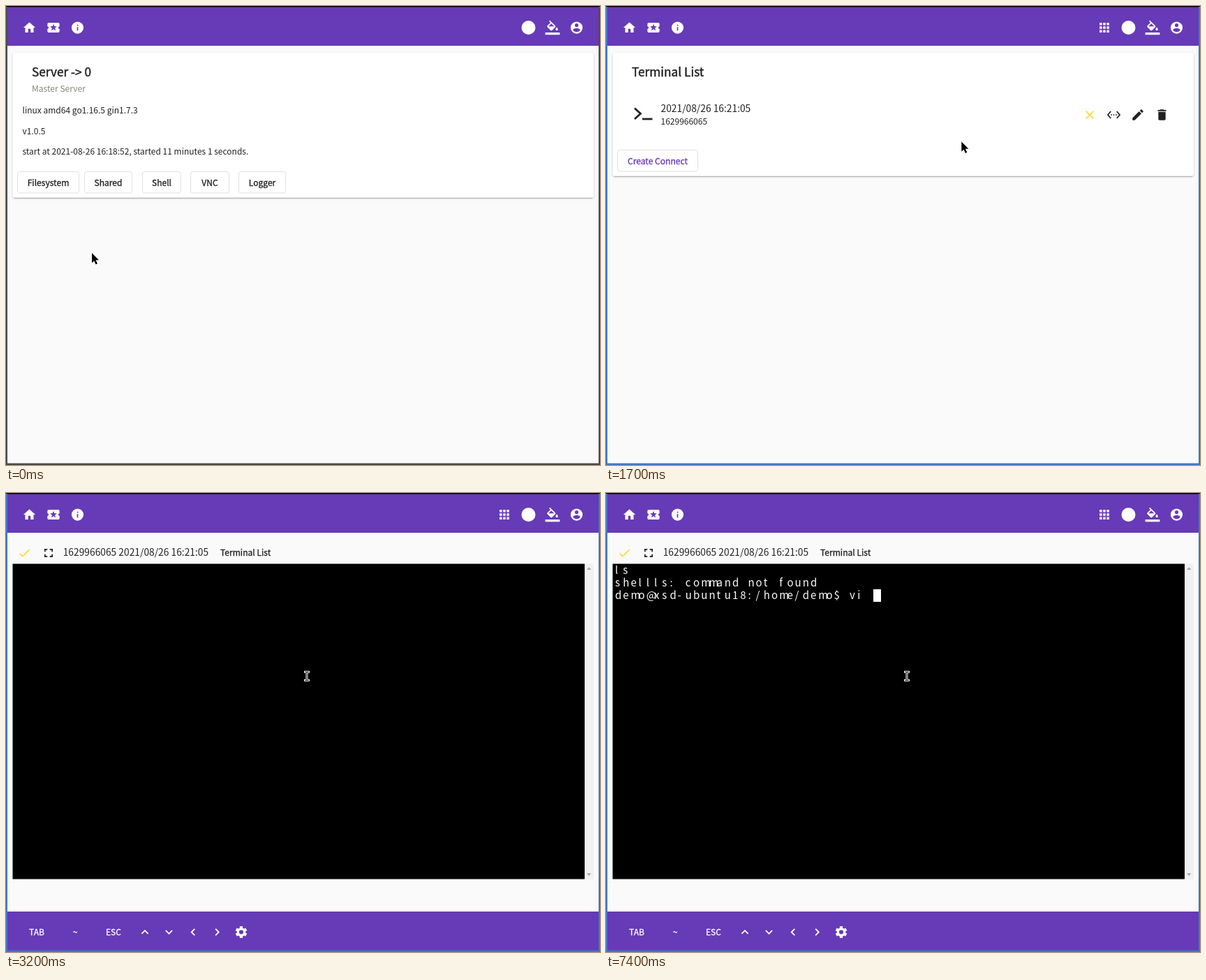
These frames come from a looping animation (851x658 px, 8000 ms). An HTML page with a canvas:

```html
<!DOCTYPE html>
<html lang="en">
<head>
<meta charset="utf-8">
<title>Web terminal</title>
<style>
html, body { margin: 0; width: 100%; height: 100%; overflow: hidden; background: #fafafa; }
canvas { display: block; }
</style>
</head>
<body>
<canvas id="stage" width="851" height="658"></canvas>
<script>
const ctx = document.getElementById('stage').getContext('2d');
const LOOP = 8000;
const SCALE = 0.8625; // the page is shown at this zoom
const UI = '"Noto Sans CJK SC","Noto Sans CJK JP","Noto Sans CJK",sans-serif';
const BAR = '"Noto Sans","Open Sans",sans-serif';
const PURPLE = '#673ab7', BLUE = '#4075c9', INK = '#212121', AMBER = '#ffd740';

const icons = {
  home: 'M10 20v-6h4v6h5v-8h3L12 3 2 12h3v8z',
  ticket: 'M20 12c0-1.1.9-2 2-2V6c0-1.1-.9-2-2-2H4c-1.1 0-2 .9-2 2v4c1.1 0 2 .9 2 2s-.9 2-2 2v4c0 1.1.9 2 2 2h16c1.1 0 2-.9 2-2v-4c-1.1 0-2-.9-2-2zm-4.42 4.8L12 14.5l-3.58 2.3 1.08-4.12-3.29-2.69 4.24-.25L12 5.8l1.54 3.95 4.24.25-3.29 2.69 1.09 4.11z',
  info: 'M12 2a10 10 0 1 0 0 20a10 10 0 1 0 0-20zm1 15h-2v-6h2v6zm0-8h-2V7h2v2z',
  apps: 'M4 4h4v4H4zM10 4h4v4h-4zM16 4h4v4h-4zM4 10h4v4H4zM10 10h4v4h-4zM16 10h4v4h-4zM4 16h4v4H4zM10 16h4v4h-4zM16 16h4v4h-4z',
  fill: 'M16.56 8.94L7.62 0 6.21 1.41l2.38 2.38-5.15 5.15c-.59.59-.59 1.54 0 2.12l5.5 5.5c.29.29.68.44 1.06.44s.77-.15 1.06-.44l5.5-5.5c.59-.58.59-1.53 0-2.12zM5.21 10L10 5.21 14.79 10H5.21zM19 11.5s-2 2.17-2 3.5c0 1.1.9 2 2 2s2-.9 2-2c0-1.33-2-3.5-2-3.5zM0 20h24v4H0z',
  account: 'M12 2a10 10 0 1 0 0 20a10 10 0 1 0 0-20zm0 3a3 3 0 1 1 0 6a3 3 0 1 1 0-6zm0 14.2c-2.5 0-4.71-1.28-6-3.22.03-1.99 4-3.08 6-3.08 1.99 0 5.97 1.09 6 3.08-1.29 1.94-3.5 3.22-6 3.22z',
  close: 'M19 6.41L17.59 5 12 10.59 6.41 5 5 6.41 10.59 12 5 17.59 6.41 19 12 13.41 17.59 19 19 17.59 13.41 12z',
  done: 'M9 16.2L4.8 12l-1.4 1.4L9 19 21 7l-1.4-1.4z',
  link: 'M7.77 6.76L6.23 5.48.82 12l5.41 6.52 1.54-1.28L3.42 12zM7 13h2v-2H7zm10-2h-2v2h2zm-6 2h2v-2h-2zm6.77-7.52l-1.54 1.28L20.58 12l-4.35 5.24 1.54 1.28L23.18 12z',
  edit: 'M3 17.25V21h3.75L17.81 9.94l-3.75-3.75zM20.71 7.04c.39-.39.39-1.02 0-1.41l-2.34-2.34c-.39-.39-1.02-.39-1.41 0l-1.83 1.83 3.75 3.75z',
  trash: 'M6 19c0 1.1.9 2 2 2h8c1.1 0 2-.9 2-2V7H6zM19 4h-3.5l-1-1h-5l-1 1H5v2h14z',
  full: 'M7 14H5v5h5v-2H7zm-2-4h2V7h3V5H5zm12 7h-3v2h5v-5h-2zM14 5v2h3v3h2V5z'
};
for (const k in icons) icons[k] = new Path2D(icons[k]);

const arrowShape = new Path2D('M0 0V14.2L3.2 11.2 5.6 16.4 8 15.3 5.6 10.3H10z');
const handShape = new Path2D('M4.2 13.5L.3 8.6Q0 7 1.8 7.4L3.6 9V1Q4.6-.6 5.7 1V5.2Q7 4 7.8 5.6 9 4.6 9.9 6.2 11.4 5.4 11.9 7.2V11L10.8 13.5z');

function rect(x, y, w, h, color) {
  ctx.fillStyle = color;
  ctx.fillRect(x, y, w, h);
}

function round(x, y, w, h, r) {
  ctx.beginPath();
  ctx.roundRect(x, y, w, h, r);
}

function icon(name, x, y, color = '#fff') {
  ctx.save();
  ctx.translate(x, y);
  ctx.scale(SCALE, SCALE);
  ctx.translate(-12, -12);
  ctx.fillStyle = color;
  ctx.fill(icons[name], 'evenodd');
  ctx.restore();
}

function line(points, color, width) {
  ctx.beginPath();
  points.forEach(([x, y]) => ctx.lineTo(x, y));
  ctx.strokeStyle = color;
  ctx.lineWidth = width;
  ctx.stroke();
}

function disc(x, y, r, color) {
  ctx.beginPath();
  ctx.arc(x, y, r, 0, 7);
  ctx.fillStyle = color;
  ctx.fill();
}

function widthAt(weight) {
  ctx.font = `${weight} 40px ${UI}`;
  return ctx.measureText('Terminal List').width;
}

// Thicken medium text when only the regular weight is installed.
const noMedium = widthAt(500) === widthAt(400);

function text(str, x, y, size, { color = INK, weight = 400, align = 'left', font = UI } = {}) {
  ctx.font = `${weight} ${size}px ${font}`;
  ctx.textAlign = align;
  ctx.fillStyle = color;
  ctx.fillText(str, x, y);
  if (weight === 500 && noMedium) {
    ctx.strokeStyle = color;
    ctx.lineWidth = size * 0.025;
    ctx.strokeText(str, x, y);
  }
}

function card(bottom) {
  ctx.save();
  ctx.shadowColor = 'rgba(0,0,0,.22)';
  ctx.shadowBlur = 3;
  ctx.shadowOffsetY = 1;
  round(9.5, 67, 832.5, bottom - 67, 3.5);
  ctx.fillStyle = '#fff';
  ctx.fill();
  ctx.restore();
  rect(12, bottom - 0.3, 828, 1, 'rgba(0,0,0,.22)');
}

function button(label, x, y, w, color = INK) {
  round(x, y, w, 30.5, 3.5);
  ctx.fillStyle = '#fff';
  ctx.fill();
  ctx.strokeStyle = '#e0e0e0';
  ctx.lineWidth = 1;
  ctx.stroke();
  text(label, x + w / 2, y + 20, 12.07, { color, weight: 500, align: 'center' });
}

function header(withApps) {
  rect(0, 0, 851, 658, '#fafafa');
  rect(2, 1, 847, 56, PURPLE);
  icon('home', 33.5, 31);
  icon('ticket', 68, 31);
  icon('info', 102.5, 31);
  if (withApps) icon('apps', 714, 31);
  disc(748.5, 31, 10, '#fff');
  icon('fill', 783, 31);
  icon('account', 817.5, 31);
}

function serverPage() {
  card(275);
  text('Server -> 0', 37, 100.5, 17.25, { weight: 500 });
  text('Master Server', 37, 123, 12.07, { color: '#87857a' });
  text('linux amd64 go1.16.5 gin1.7.3', 23.5, 154, 12);
  text('v1.0.5', 23.5, 183.5, 12);
  text('start at 2021-08-26 16:18:52, started 11 minutes 1 seconds.', 23.5, 213, 12);
  button('Filesystem', 16.5, 237.5, 88);
  button('Shared', 112.5, 237.5, 68);
  button('Shell', 195.5, 237.5, 55);
  button('VNC', 264.5, 237.5, 55);
  button('Logger', 333.5, 237.5, 67);
}

function listPage(tip) {
  card(244);
  text('Terminal List', 37, 100.5, 17.25, { weight: 500 });
  line([[41, 146.5], [49.5, 154.3], [41, 162]], INK, 2.8);
  line([[52, 162], [66.5, 162]], INK, 2.8);
  text('2021/08/26 16:21:05', 78.5, 151.5, 13.8);
  text('1629966065', 78.5, 170, 12);
  icon('close', 693, 156, AMBER);
  icon('link', 727.5, 156, INK);
  icon('edit', 762, 156, INK);
  icon('trash', 796.5, 156, INK);
  button('Create Connect', 16.5, 206.5, 115, PURPLE);
  if (tip) {
    round(701, 183.5, 53.5, 25, 3.5);
    ctx.fillStyle = 'rgba(97,97,97,.92)';
    ctx.fill();
    text('Connect', 727.7, 200.5, 10.35, { color: '#fff', align: 'center' });
  }
}

function gear(x, y, color) {
  for (let i = 0; i < 6; i++) {
    const a = Math.PI * (i / 3 + 0.5), c = Math.cos(a), s = Math.sin(a);
    line([[x + c * 5, y + s * 5], [x + c * 8.4, y + s * 8.4]], color, 4.3);
  }
  ctx.beginPath();
  ctx.arc(x, y, 4.7, 0, 7);
  ctx.lineWidth = 3.3;
  ctx.stroke();
}

function chevron(x, y, angle) {
  ctx.save();
  ctx.translate(x, y);
  ctx.rotate(angle);
  line([[-4.6, 2.3], [0, -2.3], [4.6, 2.3]], '#fff', 1.8);
  ctx.restore();
}

const CELL = 11.2, ROW = 18;
const PROMPT = 'demo@xsd-ubuntu18:/home/demo$ ';

function cells(str, row) {
  [...str].forEach((ch, i) => text(ch, 13 + i * CELL, 116 + row * ROW, 15, { color: '#fff' }));
}

function shell(t) {
  let lines = [''];
  if (t >= 4700) {
    const typed = 'vi '.slice(0, t < 5600 ? 0 : t < 5900 ? 1 : t < 6200 ? 2 : 3);
    lines = ['ls', 'shellls: command not found', PROMPT + typed];
  } else if (t >= 4600) lines = ['ls', ''];
  else if (t >= 4300) lines = ['ls'];
  else if (t >= 4200) lines = ['l'];
  lines.forEach(cells);
  const off = [[0, 2600], [3200, 3800], [5300, 5600], [6800, 7400]];
  if (!off.some(([a, b]) => t >= a && t < b)) {
    const row = lines.length - 1;
    rect(Math.round(13 + lines[row].length * CELL), 102 + row * ROW, 11, ROW, '#fff');
  }
}

function terminalPage(t) {
  const ready = t >= 2600;
  icon(ready ? 'done' : 'close', 26.5, 86, AMBER);
  icon('full', 61, 86, INK);
  if (ready) text('1629966065 2021/08/26 16:21:05', 81.7, 90, 13.8);
  text('Terminal List', ready ? 307 : 92.5, 89.5, 12.07, { weight: 500 });
  rect(9.5, 101.5, 819.5, 452, '#000');
  rect(829, 101.5, 13, 452, '#f1f1f1');
  ctx.fillStyle = '#a3a3a3';
  ctx.fill(new Path2D('M832 110L835.2 106.5 838.4 110zM832 545.2L835.2 548.7 838.4 545.2z'));
  shell(t);
  rect(2, 600, 847, 56, PURPLE);
  [['TAB', 44], ['~', 99], ['ESC', 154]].forEach(([label, x]) =>
    text(label, x, 634, 12.07, { color: '#fff', weight: 500, align: 'center' }));
  [0, 2, 3, 1].forEach((turn, i) => chevron(199 + i * 34.5, 629.5, turn * Math.PI / 2));
  gear(337, 629.5, ready ? '#fff' : '#4c2b87');
}

function frame(active, status) {
  const color = active ? BLUE : '#4a4a4a';
  rect(0, 0, 851, 1.5, '#000');
  rect(0, 1.5, 2, 656.5, color);
  rect(849, 1.5, 2, 656.5, color);
  rect(0, 655.5, 851, 2.5, color);
  if (!status) return;
  round(1, 631, 282, 26, [0, 3, 0, 0]);
  ctx.fillStyle = BLUE;
  ctx.fill();
  text(status, 7, 648.5, 13.8, { color: '#fff', font: BAR });
}

function pointer(kind, x, y) {
  ctx.save();
  ctx.translate(x, y);
  ctx.lineJoin = 'round';
  if (kind === 'beam') {
    const beam = new Path2D('M-2.5-5.5H2.5M-2.5 6.5H2.5M0-5.5V6.5');
    ctx.lineCap = 'square';
    ctx.strokeStyle = '#fff';
    ctx.lineWidth = 3;
    ctx.stroke(beam);
    ctx.strokeStyle = '#000';
    ctx.lineWidth = 1;
    ctx.stroke(beam);
  } else {
    const shape = kind === 'hand' ? handShape : arrowShape;
    if (kind === 'hand') ctx.translate(-4.5, 0);
    ctx.strokeStyle = '#fff';
    ctx.lineWidth = 2;
    ctx.stroke(shape);
    ctx.fillStyle = '#000';
    ctx.fill(shape);
  }
  ctx.restore();
}

// Pointer route: start, end, from, to.
const moves = [
  [0, 900, [123, 354], [212, 254]],
  [1200, 2100, [212, 254], [722, 152]],
  [2700, 3000, [722, 153], [431, 262]]
];

function pointerAt(t) {
  const [a, b, from, to] = moves[t < 1200 ? 0 : t < 2400 ? 1 : 2];
  const p = Math.min(1, Math.max(0, (t - a) / (b - a)));
  const e = p * p * (3 - 2 * p);
  return from.map((v, i) => v + (to[i] - v) * e);
}

function draw(time) {
  const t = Math.floor(time / 100) * 100;
  const [x, y] = pointerAt(t);
  const onShell = t < 1000 && x > 195 && y < 268;
  const onLink = t >= 1300 && t < 2400 && x > 710;
  const host = 'xsd-yc.cdsdxh.cn:3443/view/';
  let status = '';
  if (onShell || (t >= 1000 && t < 1300)) status = host + 'en-US/…/0';
  if (onLink || (t >= 2400 && t < 2800)) status = host + '…/1629966…';

  header(t >= 1000);
  if (t < 1000) serverPage();
  else if (t < 2400) listPage(onLink);
  else terminalPage(t);
  frame(t >= 800, status);
  pointer(t >= 2400 ? 'beam' : onShell || onLink ? 'hand' : 'arrow', x, y);
}

const start = performance.now();
function tick() {
  draw((performance.now() - start) % LOOP);
  requestAnimationFrame(tick);
}
tick();
</script>
</body>
</html>
```
